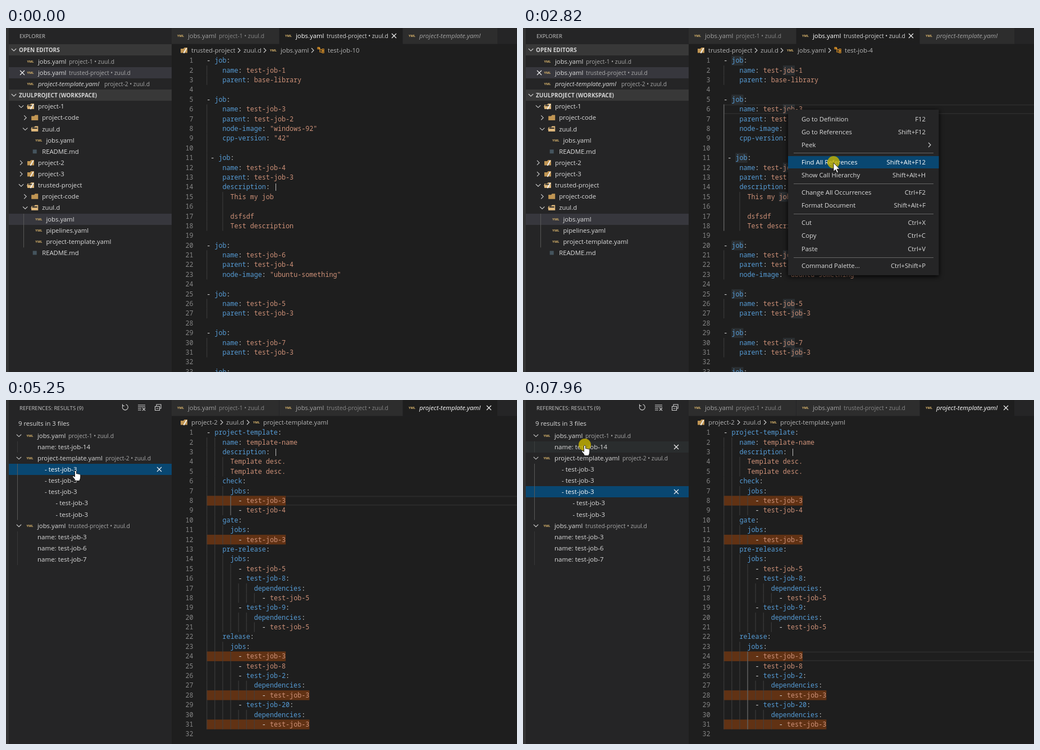
These frames come from a looping animation (910 px wide and 615 px high, 8000 ms). An HTML page:

```html
<!DOCTYPE html>
<html lang="en">
<head>
<meta charset="utf-8">
<title>Find all references</title>
<style>
  html, body { margin: 0; width: 100%; height: 100%; overflow: hidden; background: #1e1e1e; }
  svg { display: block; width: 100%; height: 100%; }
  text { font: 11.3px "Open Sans", "Noto Sans", sans-serif; fill: #dcdcdc; white-space: pre; }
  .code { font: 11.733px "Noto Sans Mono", "DejaVu Sans Mono", monospace; fill: #d4d4d4; }
  .num { fill: #858585; text-anchor: end; }
  .key { fill: #569cd6; }
  .str { fill: #ce9178; }
  .desc { font-size: 10.3px; fill: #a8a8a8; }
  .title { font-size: 9.55px; fill: #c8c8c8; }
  .head { font-size: 10.04px; font-weight: 700; fill: #d4d4d4; }
  .crumb { fill: #b4b4b4; }
  .dim { fill: #a2a2a2; }
  .dim.desc { fill: #868686; }
  .on { fill: #fff; }
  .on.desc { fill: #d4d4d4; }
  .ref { font-size: 11.5px; }
  .it { font-style: italic; }
  .end { text-anchor: end; }
  .yml { font-size: 5.7px; font-weight: 700; fill: #d8b46c; text-anchor: middle; }
  .menu-box { filter: drop-shadow(0 2px 4px #000); }
  .line { fill: none; stroke: #d0d0d0; stroke-width: 1.1; }
</style>
</head>
<body>
<svg id="stage" viewBox="0 0 910 615"></svg>
<script>
const LOOP = 8000, ROW = 20.13, LINE = 17.39, CHAR = 7.04;
const stage = document.getElementById('stage');

// ---- drawing helpers ----
function add(parent, tag, attrs = {}, content) {
  const node = document.createElementNS('http://www.w3.org/2000/svg', tag);
  for (const k in attrs) node.setAttribute(k, attrs[k]);
  if (content !== undefined) node.textContent = content;
  parent.appendChild(node);
  return node;
}
const group = (p, attrs) => add(p, 'g', attrs);
const box = (p, x, y, width, height, fill) => add(p, 'rect', { x, y, width, height, fill });
const label = (p, x, mid, str, cls = '') => add(p, 'text', { x, y: mid + 4, class: cls }, str);
const path = (p, d, attrs) => add(p, 'path', { d, class: 'line', ...attrs });
const bar = (p, y, fill) => box(p, 5, y, 290, 20, fill);
const show = (node, on) => { node.style.display = on ? '' : 'none'; };

const yml = (p, x, y) => add(p, 'text', { x, y: y + 2, class: 'yml' }, 'YML');
const md = (p, x, y) => box(p, x - 3.5, y - 3.5, 7, 7, '#45545e');
const cross = (p, x, y) => path(p, `M${x - 4} ${y - 4}l8 8m0-8l-8 8`, { style: 'stroke:#f4f4f4' });
const right = (p, x, y) => path(p, `M${x - 2} ${y - 4}l4 4l-4 4`);
const down = (p, x, y) => path(p, `M${x - 4.2} ${y - 2}l4.2 4l4.2-4`);

function folder(p, x, y, open, root) {
  const g = group(p, { transform: `translate(${x} ${y})` });
  add(g, 'path', { d: 'M-6-3h5l1.5-2h5.5v9.5h-12z', fill: open ? '#dcb67a' : '#c09553' });
  if (open) {
    add(g, 'path', { d: 'M-4.5-2.5h9v2h-9z', fill: '#252526' });
    add(g, 'path', { d: 'M-7-.5h11l2 5h-11.5z', fill: '#dcb67a' });
  }
  if (root) path(g, 'M-.5 5l5-9', { style: 'stroke:#f4f4f4;stroke-width:1.8' });
}

// ---- frame of the window ----
box(stage, 0, 0, 910, 615, '#1e1e1e');
box(stage, 295, 0, 615, 28.5, '#252526');
box(stage, 0, 0, 5, 615, '#333');
box(stage, 5, 0, 290, 615, '#252526');

function tabs(parent, active) {
  const list = [
    [295, 191, 'jobs.yaml', 'project-1 • zuul.d', 84],
    [487, 219, 'jobs.yaml', 'trusted-project • zuul.d', 84],
    [707, 168, 'project-template.yaml', '', 0]
  ];
  list.forEach(([x, w, name, desc, dx], i) => {
    const tone = i === active ? 'on' : 'dim';
    box(parent, x, 0, w, 28.5, i === active ? '#1e1e1e' : '#2d2d2d');
    yml(parent, x + 16, 14);
    label(parent, x + 29, 14, name, tone + (i === 2 ? ' it' : ''));
    label(parent, x + dx, 14, desc, tone + ' desc');
    if (i === active) cross(parent, x + w - 15, 14);
  });
}

function crumbs(parent, parts, seps, iconX) {
  folder(parent, 317, 40, false, true);
  parts.forEach(([x, name]) => label(parent, x, 40, name, 'crumb'));
  seps.forEach(x => right(parent, x, 40));
  yml(parent, iconX, 40);
}

// ---- editor ----
const JOBS = `- job:
    name: test-job-1
    parent: base-library

- job:
    name: test-job-3
    parent: test-job-2
    node-image: "windows-92"
    cpp-version: "42"

 - job:
    name: test-job-4
    parent: test-job-3
    description: |
      This my job

      dsfsdf
      Test description

- job:
    name: test-job-6
    parent: test-job-4
    node-image: "ubuntu-something"

- job:
    name: test-job-5
    parent: test-job-3

- job:
    name: test-job-7
    parent: test-job-3

- job:`.split('\n');

const TEMPLATE = `- project-template:
    name: template-name
    description: |
      Template desc.
      Template desc.
    check:
      jobs:
        - test-job-3
        - test-job-4
    gate:
      jobs:
        - test-job-3
    pre-release:
      jobs:
        - test-job-5
        - test-job-8:
            dependencies:
              - test-job-5
        - test-job-9:
            dependencies:
              - test-job-5
    release:
      jobs:
        - test-job-3
        - test-job-8
        - test-job-2:
            dependencies:
              - test-job-3
        - test-job-20:
            dependencies:
              - test-job-3
`.split('\n');

const colX = c => 357.3 + CHAR * c;
const midY = n => 58.3 + LINE * (n - 1);
const topY = n => midY(n) - LINE / 2;

function guide(p, col, from, to, color) {
  box(p, colX(col), topY(from), 1, LINE * (to - from + 1), color);
}
function depth(lines, i) {
  const indent = s => s ? s.search(/\S/) : 0;
  return lines[i] ? indent(lines[i]) : Math.min(indent(lines[i - 1]), indent(lines[i + 1]));
}
function caretBox(p, n) {
  return add(p, 'rect', { x: 358, y: topY(n) + 1, width: 556, height: LINE - 2, fill: 'none', stroke: '#2b2b2b', 'stroke-width': 1.8 });
}

// carets: line, guide column, first and last line of the guide
function editor(parent, lines, tab, marked, carets) {
  const boxes = carets.map(([n]) => caretBox(parent, n));
  const marks = group(parent), words = group(parent), text = group(parent);
  marked.forEach(n =>
    box(marks, 357.3, topY(n), CHAR * lines[n - 1].length, LINE, '#613214'));
  lines.forEach((line, i) => {
    const n = i + 1, y = midY(n);
    label(text, 333.5, y, n, 'code num');
    for (let c = 0; c < depth(lines, i); c += tab) guide(text, c, n, n, '#404040');
    for (const m of line.matchAll(/\bjob\b/g))
      box(words, colX(m.index), topY(n), CHAR * 3, LINE, 'rgba(173,214,255,.085)');
    const [, lead, dash, key, value] = line.match(/^(\s*)(- )?([\w-]+(?=:))?(.*)$/);
    let col = lead.length;
    const put = (str, cls) => {
      if (str.trim()) label(text, colX(col), y, str, 'code ' + cls);
      col += str.length;
    };
    if (dash) put(dash, '');
    if (key) { put(key, 'key'); put(':', ''); }
    const rest = key ? value.slice(1) : value;
    if (rest[0] === ' ') col++;
    put(rest.trimStart(), rest.trim() === '|' ? '' : 'str');
  });
  const active = carets.map(([, ...span]) => {
    const g = group(parent);
    guide(g, ...span, '#707070');
    return g;
  });
  return { marks, words, caret: (k, on) => { show(boxes[k], on); show(active[k], on); } };
}

const jobsView = group(stage), tplView = group(stage);
tabs(jobsView, 1);
tabs(tplView, 2);
crumbs(jobsView, [[330, 'trusted-project'], [423, 'zuul.d'], [489, 'jobs.yaml']], [415, 461, 546], 476);
path(jobsView, 'M556 36h3v7h4M559 39h4M563 37.5h3v3h-3zM563 41.5h3v3h-3zM555 34.5h3v3h-3z', { style: 'stroke:#ee9d28' });
const symbol = label(jobsView, 573, 40, '', 'crumb');
crumbs(tplView, [[330, 'project-2'], [392, 'zuul.d'], [458, 'project-template.yaml']], [384, 431], 446);
const jobs = editor(jobsView, JOBS, 4, [6, 21, 30], [[6, 0, 6, 18]]);
const tpl = editor(tplView, TEMPLATE, 2, [8, 12, 24, 28, 31], [[8, 6, 8, 9], [24, 6, 24, 31]]);
show(tpl.words, false);

// ---- explorer ----
const explorer = group(stage);
label(explorer, 24, 14, 'EXPLORER', 'title');
[[39, 'OPEN EDITORS'], [120, 'ZUULPROJECT (WORKSPACE)']].forEach(([y, name]) => {
  bar(explorer, y - 10, '#383838');
  down(explorer, 14, y);
  label(explorer, 23, y, name, 'head');
});
bar(explorer, 70, '#37373d');
cross(explorer, 29, 80);
[['jobs.yaml', 'project-1', 112], ['jobs.yaml', 'trusted-project', 112], ['project-template.yaml', 'project-2', 175]]
  .forEach(([name, place, x], i) => {
    const y = 60 + 20.1 * i;
    yml(explorer, 43.5, y);
    label(explorer, 57, y, name, i === 2 ? 'it' : '');
    label(explorer, x, y, place + ' • zuul.d', 'desc');
  });

// depth, kind (o: open, c: closed, y: yaml, m: markdown), name
const TREE = `0o project-1|1c project-code|1o zuul.d|2y jobs.yaml|1m README.md|0c project-2|0c project-3
0o trusted-project|1c project-code|1o zuul.d|2y jobs.yaml|2y pipelines.yaml|2y project-template.yaml|1m README.md`;
bar(explorer, 332, '#37373d');
box(explorer, 31, 332, 1, ROW * 3, '#585858');
TREE.split(/[|\n]/).forEach((item, i) => {
  const d = +item[0], kind = item[1], y = 140.3 + ROW * i, x = 44 + 7.2 * d;
  if (kind === 'y') yml(explorer, x, y);
  else if (kind === 'm') md(explorer, x, y);
  else {
    folder(explorer, x, y, kind === 'o', d === 0);
    (kind === 'o' ? down : right)(explorer, x - 17, y);
  }
  label(explorer, x + 13, y, item.slice(3));
});

// ---- reference results ----
const refs = group(stage);
const refY = i => 63.6 + ROW * i;
const hoverRow = group(refs), pickRow = group(refs);
for (const [g, fill] of [[hoverRow, '#2a2d2e'], [pickRow, '#094771']]) {
  bar(g, -10, fill);
  cross(g, 273, 0);
}
const placeRow = (g, i) => g.setAttribute('transform', `translate(0 ${Math.round(refY(i))})`);
label(refs, 24, 14, 'REFERENCES: RESULTS (9)', 'title');
label(refs, 22, 41.5, '9 results in 3 files');
path(refs, 'M208.5 9.5a5 5 0 1 0 5-1.5M207.5 7.5v3h3.5');
path(refs, 'M235 9h13M235 12h13M235 15h6M235 18h6M243 14l5 5m0-5l-5 5');
path(refs, 'M265.5 11.5h8v7h-8zM268 11v-3h8v7h-2M267.5 15h4');
const progress = box(refs, 5, 27, 6, 2, '#0e70c0');
const guides = [[1, 1], [3, 5], [9, 3]].map(([i, n]) =>
  box(refs, 20, refY(i) - ROW / 2, 1, ROW * n, '#585858'));
const REFS = ['jobs.yaml/project-1/111', 'name: test-job-14', 'project-template.yaml/project-2/177',
  ...Array(5).fill('- test-job-3'), 'jobs.yaml/trusted-project/111',
  'name: test-job-3', 'name: test-job-6', 'name: test-job-7'];
const refText = REFS.map((item, i) => {
  const [name, place, x] = item.split('/'), y = refY(i);
  if (place) {
    down(refs, 23, y);
    yml(refs, 42.5, y);
    label(refs, x, y, place + ' • zuul.d', 'desc');
  }
  return label(refs, name[0] !== '-' ? 56 : i < 6 ? 69 : 88.5, y, name, place ? '' : 'ref');
});

// ---- context menu ----
const menu = group(stage);
add(menu, 'rect', { x: 472, y: 146, width: 268.5, height: 296, fill: '#252526', class: 'menu-box' });
const menuBar = box(menu, 472, 0, 268.5, 22, '#094771');
const MENU = [
  [163, 'Go to Definition', 'F12'], [186, 'Go to References', 'Shift+F12'], [209, 'Peek', ''],
  [240, 'Find All References', 'Shift+Alt+F12'], [263, 'Show Call Hierarchy', 'Shift+Alt+H'],
  [294, 'Change All Occurrences', 'Ctrl+F2'], [317, 'Format Document', 'Shift+Alt+F'],
  [348, 'Cut', 'Ctrl+X'], [371, 'Copy', 'Ctrl+C'], [394.5, 'Paste', 'Ctrl+V'],
  [425, 'Command Palette...', 'Ctrl+Shift+P']
];
const menuText = MENU.map(([y, name, keys]) =>
  [label(menu, 496, y, name), label(menu, 717, y, keys)]);
right(menu, 724, 209);
[223, 278, 332, 410].forEach(y => box(menu, 482, y, 249, 1, '#666'));

// ---- pointer ----
const pointer = group(stage);
const ring = add(pointer, 'circle', { r: 11, cy: -1, fill: '#c8b400', opacity: .8 });
const ink = { fill: '#fff', stroke: '#000', 'stroke-width': .8 };
const shapes = {
  arrow: add(pointer, 'path', { d: 'M0 0v15.5l3.6-3.3l2.5 5.6l2.4-1.1l-2.5-5.4h5z', ...ink }),
  beam: path(pointer, 'M-3-6.5h2.2l.8.8l.8-.8h2.2M0-5.5v11M-3 6.5h2.2l.8-.8l.8.8h2.2', { style: 'stroke:#e6e6e6' }),
  hand: add(pointer, 'path', { d: 'M-1.5 1q1.5-2 3 0v5q1.3-1 2.5.3q1.3-.8 2.3.5q1.8-.6 2.4 1v4q0 3-2 6.700h-7q-1.5-4-5-7q-.5-2.5 2-1.6l1.8 1.6z', ...ink })
};

// time, x, y
const MOVES = [
  [310, 520, 300], [800, 474, 150], [1090, 473, 146], [1780, 473, 146], [1950, 520, 168],
  [2020, 535, 188], [2100, 549, 217], [2180, 549, 217], [2260, 552, 232], [2430, 553, 241],
  [3050, 553, 241], [3220, 555, 242], [3280, 555, 242], [3400, 520, 270], [3700, 430, 470],
  [4000, 348, 598], [4060, 335, 590], [4380, 126, 250], [4460, 126, 250], [4650, 126, 60],
  [4850, 124, 137], [4940, 124, 126], [5390, 124, 126], [5540, 120, 133], [5770, 116, 143],
  [5860, 116, 143], [6170, 115, 168], [6480, 115, 168], [6710, 124, 173], [6860, 140, 188],
  [7240, 140, 188], [7320, 203, 202], [7400, 203, 202], [7720, 112, 90], [7880, 110, 81],
  [8000, 110, 81]
];
const CLICKS = [[2820, 2980], [5130, 5200], [6320, 6390], [7950, 8000]];

function pointerAt(t) {
  const i = MOVES.findIndex(m => m[0] > t);
  if (i < 1) return MOVES[0].slice(1);
  const [t0, x0, y0] = MOVES[i - 1], [t1, x1, y1] = MOVES[i];
  const k = (t - t0) / (t1 - t0);
  return [x0 + (x1 - x0) * k, y0 + (y1 - y0) * k];
}

function render(t) {
  const [x, y] = pointerAt(t);
  const menuOn = t >= 1710 && t < 2980, refsOn = t >= 3050, tplOn = t >= 5200;

  show(jobsView, !tplOn);
  show(tplView, tplOn);
  symbol.textContent = t < 800 ? 'test-job-10' : 'test-job-4';
  jobs.caret(0, t >= 800);
  show(jobs.words, t >= 1250);
  show(jobs.marks, refsOn);
  tpl.caret(0, t < 6390);
  tpl.caret(1, t >= 6390);

  show(menu, menuOn);
  const item = t < 1850 ? -1 : MENU.findIndex(m => Math.abs(m[0] - y) <= 11.5);
  show(menuBar, item >= 0);
  if (item >= 0) menuBar.setAttribute('y', MENU[item][0] - 11);
  menuText.forEach(([name, keys], i) => {
    const tone = i === item ? 'on' : '';
    name.setAttribute('class', tone);
    keys.setAttribute('class', 'end ' + tone);
  });

  show(explorer, !refsOn);
  show(refs, refsOn);
  show(progress, t < 3300);
  const picked = t < 3300 ? 4 : !tplOn ? 9 : t < 6390 ? 3 : 5;
  const over = x < 295 ? Math.floor((y - refY(0)) / ROW + .5) : -1;
  const onRow = refsOn && over >= 0 && over < REFS.length;
  placeRow(pickRow, picked);
  show(hoverRow, onRow && over !== picked);
  placeRow(hoverRow, over);
  refText.forEach((node, i) => node.classList.toggle('on', i === picked));
  guides.forEach((g, i) => {
    const active = i === (picked === 9 ? 2 : 1);
    g.setAttribute('opacity', active ? 1 : x < 295 ? .4 : 0);
  });

  show(pointer, t >= 310);
  pointer.setAttribute('transform', `translate(${x.toFixed(1)} ${y.toFixed(1)})`);
  const shape = onRow ? 'hand' : t >= 1550 && t < 2980 || x < 295 ? 'arrow' : 'beam';
  for (const name in shapes) show(shapes[name], name === shape);
  show(ring, CLICKS.some(([a, b]) => t >= a && t < b));
}

const start = performance.now();
function tick() {
  render((performance.now() - start) % LOOP);
  requestAnimationFrame(tick);
}
tick();
</script>
</body>
</html>
```
